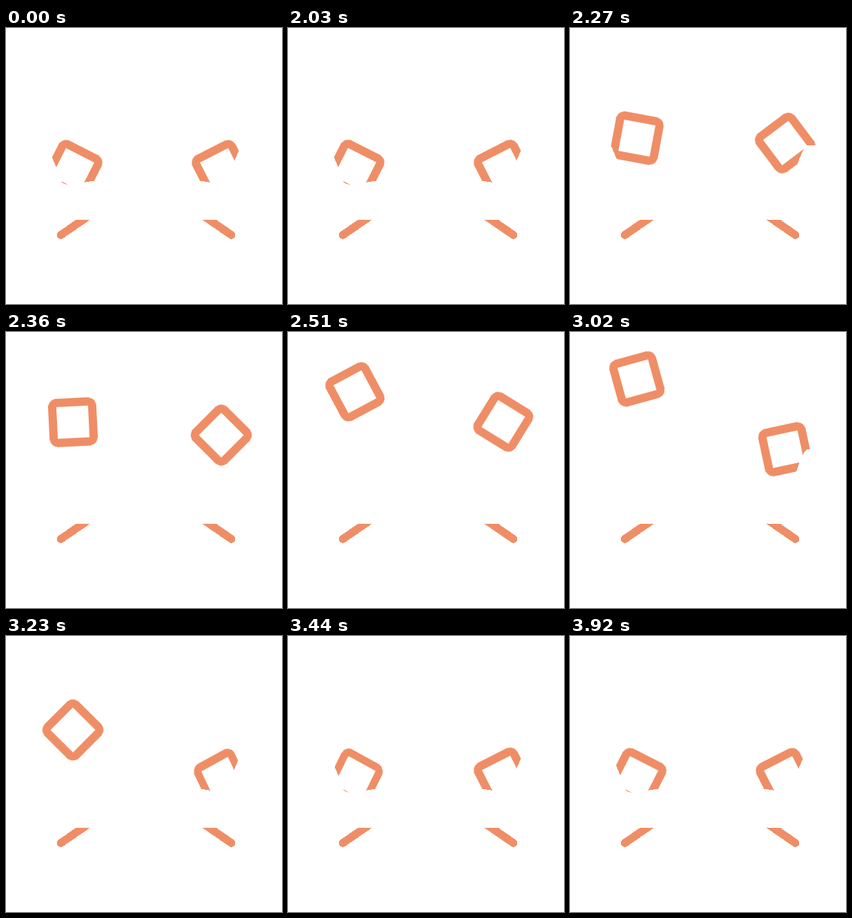
Recreate the animation shown at these times as an HTML page without scripts. Size 400x400 px, loop 3950 ms.

```html
<!DOCTYPE html>
<html lang="en">
<head>
<meta charset="utf-8">
<title>Sofa cushions</title>
<style>
  html, body { margin: 0; width: 100%; height: 100%; overflow: hidden; background: #fff; }
  svg { display: block; width: 100vw; height: 100vh; shape-rendering: crispEdges; }
  .line { fill: none; stroke: #ef8e66; stroke-width: 11.5; stroke-linecap: round; }
  .cover { fill: #fff; }

  .hop, .spin { animation: 3950ms linear infinite; }
  .left .hop { animation-name: hop-left; }
  .left .spin { animation-name: spin-left; }
  .right .hop { animation-name: hop-right; }
  .right .spin { animation-name: spin-right; }

  /* rise, free fall, squash on landing, settle */
  @keyframes hop-left {
    0%, 50.89% { transform: translateY(0) scaleX(1); animation-timing-function: cubic-bezier(.33, 0, .52, 1); }
    71.65% { transform: translateY(-157px) scaleX(1); animation-timing-function: cubic-bezier(.333, 0, .667, .333); }
    85.19% { transform: translateY(0) scaleX(1); animation-timing-function: ease-out; }
    88.1% { transform: translateY(1px) scaleX(.93); animation-timing-function: ease-in-out; }
    92.15% { transform: translateY(-1.2px) scaleX(1); animation-timing-function: ease-in-out; }
    98.73%, 100% { transform: translateY(0) scaleX(1); }
  }
  @keyframes hop-right {
    0%, 50.89% { transform: translateY(0) scaleX(1); animation-timing-function: cubic-bezier(.28, 0, .42, 1); }
    69.04% { transform: translateY(-83.6px) scaleX(1); animation-timing-function: cubic-bezier(.333, 0, .667, .333); }
    78.81% { transform: translateY(0) scaleX(1); animation-timing-function: ease-out; }
    81.77% { transform: translateY(1px) scaleX(.93); animation-timing-function: ease-in-out; }
    87.34% { transform: translateY(-.6px) scaleX(1); animation-timing-function: ease-in-out; }
    91.65%, 100% { transform: translateY(0) scaleX(1); }
  }
  @keyframes spin-left {
    0%, 50.89% { transform: rotate(27deg); animation-timing-function: cubic-bezier(.333, 0, .667, .333); }
    59.75% { transform: rotate(-2.7deg); }
    70.38% { transform: rotate(-73.5deg); }
    76.46% { transform: rotate(-105.3deg); }
    81.77% { transform: rotate(-135deg); animation-timing-function: cubic-bezier(.3, .5, .6, 1); }
    88.1%, 100% { transform: rotate(-153deg); }
  }
  @keyframes spin-right {
    0%, 50.89% { transform: rotate(-27deg); animation-timing-function: cubic-bezier(.333, 0, .667, .333); }
    59.75% { transform: rotate(-45deg); }
    70.38% { transform: rotate(-82deg); }
    76.46% { transform: rotate(-102deg); animation-timing-function: cubic-bezier(.33, .4, .6, .9); }
    81.77%, 100% { transform: rotate(-117deg); }
  }
</style>
</head>
<body>
<svg viewBox="0 0 400 400">
  <defs>
    <rect id="cushion" class="line" x="-29" y="-29" width="58" height="58" rx="6"/>
  </defs>

  <path class="line" d="M79.5 300 L121 271.5 M326.7 300 L285.2 271.5"/>

  <g class="left" transform="translate(97 205)">
    <g class="hop"><g class="spin"><use href="#cushion"/></g></g>
  </g>
  <g class="right" transform="translate(312 205)">
    <g class="hop"><g class="spin"><use href="#cushion"/></g></g>
  </g>

  <!-- white sofa body in front of cushions and leg tops -->
  <path class="cover" d="M20 200 L40 170 H56 Q61 171 63 179 L67 188 L73 202
    C74 212 76 219 82 224.3 Q86 227.2 90 227 L114 223.6 L128 221.5
    Q204 214 281 221.5 L295 223.6 Q318 227 323 219 L328 203 L331 193 L337 179
    Q341 170 345 170 H370 V277.5 H20 Z"/>
</svg>
</body>
</html>
```
